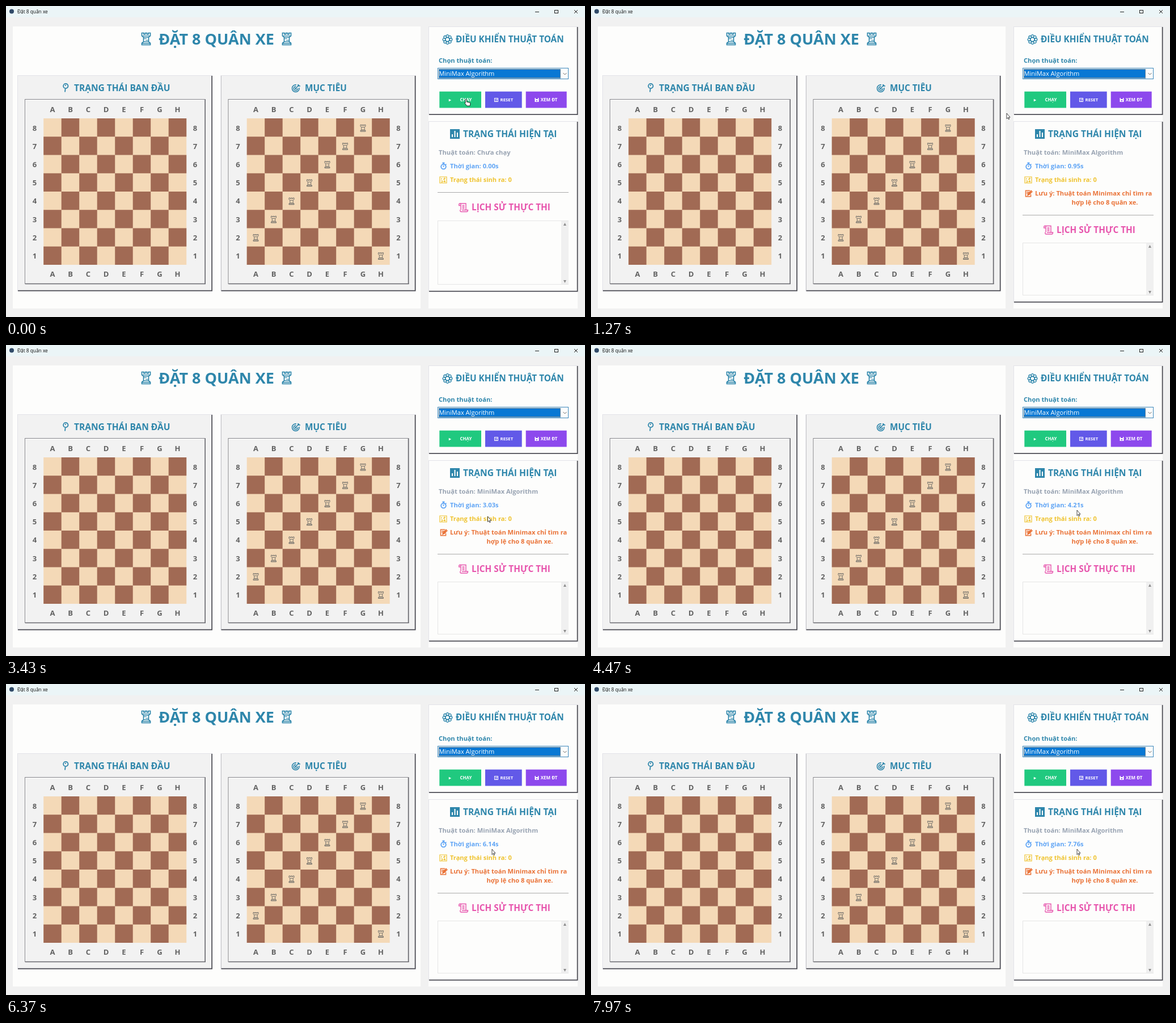
Animation of 1021 by 548 pixels, one loop 8 s. Source, as an HTML page with a canvas:

```html
<!DOCTYPE html>
<html lang="vi">
<head>
<meta charset="utf-8">
<title>Đặt 8 quân xe</title>
<style>
  html, body { margin: 0; width: 100%; height: 100%; overflow: hidden; background: #f0f0f0; }
  canvas { display: block; }
</style>
</head>
<body>
<canvas id="stage" width="1021" height="548"></canvas>
<script>
const ctx = document.getElementById('stage').getContext('2d');
const LOOP = 8000, START = 230;
const FONT = '"Open Sans", "Noto Sans", sans-serif';
const TEAL = '#2e86ab', PINK = '#e755ad', PANEL = '#fdfdfc', CARD = '#f2f2f2';

// [ms, shown seconds]; the clock advances in small ticks between these
const CLOCK = [[START, 0], [1270, .95], [2470, 2.22], [3430, 3.03], [4470, 4.21], [6370, 6.14], [7970, 7.76], [8200, 7.98]];
// [ms, x, y] of the pointer tip
const POINTER = [[0, 809, 164], [420, 809, 164], [950, 733, 189], [1900, 733, 189], [2150, 732.5, 182],
  [2600, 732.5, 182], [3250, 849.5, 302], [3500, 849.5, 302], [3800, 857, 291], [8000, 857, 291]];

const petals = Array.from({ length: 8 }, (_, i) => {
  const a = i * Math.PI / 4;
  return `M${9 + 6 * Math.cos(a) + 2.3} ${9 + 6 * Math.sin(a)}a2.3 2.3 0 1 0-4.6 0a2.3 2.3 0 1 0 4.6 0`;
}).join('');

const ICONS = {
  rook: 'M2.5 1.5h3.5v2.5h2.5v-2.5h3v2.5h2.5v-2.5h3.5v5l-3 2.5v8l3 2.5v3h-15v-3l3-2.5v-8l-3-2.5zM5.5 9h9M5.5 17h9M3 20h14',
  bricks: 'M4 6.5h12M6 11.5h5M9 14.5h5',
  gear: petals + 'M12.5 9a3.5 3.5 0 1 0-7 0a3.5 3.5 0 1 0 7 0',
  pin: 'M10.5 5a4.2 4.2 0 1 0-8.4 0a4.2 4.2 0 1 0 8.4 0M5.7 9.2l-.7 6.3M5 4.5l1.8-1.4',
  target: 'M13 7a6.3 6.3 0 1 1-5-5M10.5 8a3.6 3.6 0 1 1-3-3.2M7 8l6-6M11 4v-3M11 4h4M8 8.4a1 1 0 1 1-1-1',
  watch: 'M10.3 7.6a4.3 4.3 0 1 0-8.6 0a4.3 4.3 0 1 0 8.6 0M6 3v-2M4 1h4M9.7 3.2l1.2 1M6 8v-2.5',
  numbers: 'M1 1h12v11h-12zM4 3v3M8 3h2v1.5h-2v1.5h2M3 8h2.5v2.5h-2.5M10 7.5l-2 2h3M10 8v3',
  memo: 'M9 1.2h-7.5v10.6h9v-4M3.3 4h4M3.3 6.3h2.5M5 9.5l1-3l5-5l1.8 1.8l-5 5zM6.5 8l4.5-4.5',
  scroll: 'M4 12v-9q0-2-1.7-2q-1.5 0-1.5 2v1.5h3.2M2.5 1h10.5v11M6.5 4.5h4M6.5 7h4M6.5 9.5h4M6 12.5h10.5q0 3-2 3h-10q-1.6 0-1.6-2v-1.5'
};
for (const k in ICONS) ICONS[k] = new Path2D(ICONS[k]);

const ARROW = new Path2D('M0 0v11l2.5-2.3l1.8 3.6l1.6-.8l-1.7-3.4h3.4z');
const HAND = new Path2D('M1 1q1.5-1.5 2.4 0v4l5 1q1.5.4 1.5 2l-.8 4h-5.4l-3.5-4.6q-.6-1.5 1-1z');

function rect(x, y, x2, y2, fill) {
  ctx.fillStyle = fill;
  ctx.fillRect(x, y, x2 - x, y2 - y);
}

function frame(x, y, x2, y2, color) {
  ctx.strokeStyle = color;
  ctx.lineWidth = 1;
  ctx.strokeRect(x + .5, y + .5, x2 - x - 1, y2 - y - 1);
}

function text(s, x, mid, size, color, align = 'left', weight = 700) {
  ctx.font = `${weight} ${size}px ${FONT}`;
  ctx.textAlign = align;
  ctx.fillStyle = color;
  ctx.fillText(s, x, mid + size * .357);
}

function icon(name, x, y, color, width = 1.3, sx = 1, sy = sx) {
  ctx.save();
  ctx.translate(x, y);
  ctx.scale(sx, sy);
  ctx.strokeStyle = color;
  ctx.lineWidth = width;
  ctx.stroke(ICONS[name]);
  ctx.restore();
}

function line(x, y, x2, y2, color, width = 1) {
  ctx.strokeStyle = color;
  ctx.lineWidth = width;
  ctx.beginPath();
  ctx.moveTo(x, y);
  ctx.lineTo(x2, y2);
  ctx.stroke();
}

function triangle(x, y, dx, dy, color) {
  ctx.fillStyle = color;
  ctx.beginPath();
  ctx.moveTo(x + dx, y + dy);
  ctx.lineTo(x - dx - dy, y + dx - dy);
  ctx.lineTo(x - dx + dy, y - dx - dy);
  ctx.fill();
}

function raised(x, y, x2, y2, fill) {
  rect(x, y, x2, y2, '#e3e3e8');
  rect(x + 1, y + 1, x2, y2, '#484850');
  rect(x + 1, y + 1, x2 - 1.7, y2 - 1.7, fill);
}

function board(dx) {
  raised(20 + dx, 122, 364 + dx, 502.5, CARD);
  frame(34 + dx, 165, 351 + dx, 490, '#fff');
  frame(33 + dx, 164, 352 + dx, 490, '#85858a');
  line(351 + dx, 165, 351 + dx, 490, '#66666c', 1.4);
  line(34 + dx, 489.5, 352 + dx, 489.5, '#66666c', 1.4);

  const w = 31.5, h = 32.25, x0 = 66.2 + dx, y0 = 198;
  rect(x0, y0, x0 + 8 * w, y0 + 8 * h, '#f4d9b7');
  for (let r = 0; r < 8; r++) {
    const mid = 215 + r * 32.2;
    for (const x of [50.5, 333.5]) text(8 - r, x + dx, mid, 13, '#626262', 'center');
    for (const y of [182.5, 472.5]) text('ABCDEFGH'[r], 82 + r * w + dx, y, 13, '#626262', 'center');
    for (let c = 1 - r % 2; c < 8; c += 2) {
      rect(x0 + c * w, y0 + r * h, x0 + (c + 1) * w, y0 + (r + 1) * h, '#a16a54');
    }
  }
}

function titleBar() {
  rect(0, 0, 1021, 20, '#ebf5f7');
  ctx.fillStyle = '#304a68';
  ctx.beginPath();
  ctx.arc(10, 9.5, 4, 0, 7);
  ctx.fill();
  text('Đặt 8 quân xe', 20, 10, 8.35, '#111', 'left', 400);
  line(933, 10.5, 940, 10.5, '#222');
  frame(967, 7, 974, 13, '#222');
  line(1002, 7, 1008, 13, '#222');
  line(1008, 7, 1002, 13, '#222');
}

function boards() {
  rect(12, 36, 731, 533, PANEL);
  for (const x of [237, 485]) {
    icon('rook', x, 46, TEAL, 1.7);
    icon('bricks', x, 46, TEAL, 1.2);
  }
  text('ĐẶT 8 QUÂN XE', 371, 58, 27, TEAL, 'center');
  board(0);
  board(358.5);
  icon('pin', 99, 136, TEAL, 1.8);
  text('TRẠNG THÁI BAN ĐẦU', 120, 144.5, 15.5, TEAL);
  icon('target', 504, 137, TEAL, 1.6);
  text('MỤC TIÊU', 527, 144.5, 15.3, TEAL);
  for (let r = 0; r < 8; r++) {
    const c = (14 - r) % 8;
    icon('rook', 434.5 + c * 31.5, 208.5 + r * 32.2, '#6c6a66', 1.6, .6, .56);
  }
}

function controls() {
  rect(745, 36, 1008, 533, PANEL);
  raised(745, 36, 1008.5, 192, PANEL);
  icon('gear', 769.5, 50, TEAL, 1.4);
  text('ĐIỀU KHIỂN THUẬT TOÁN', 793, 59, 15.35, TEAL);
  text('Chọn thuật toán:', 763, 96.5, 11.15, TEAL);
  frame(761, 109, 992, 129, '#3b87bb');
  rect(763, 111, 978, 127.5, '#0878d4');
  ctx.setLineDash([1, 1]);
  frame(763, 111, 978, 127, '#b98a5c');
  ctx.setLineDash([]);
  text('MiniMax Algorithm', 763.5, 119.5, 11.05, '#fff', 'left', 400);
  line(982.5, 118, 985.5, 121, '#666');
  line(985.5, 121, 988.5, 118, '#666');

  rect(764.3, 150.7, 838, 179.5, '#20c97f');
  triangle(783, 166, 2.2, 0, '#fff');
  text('CHẠY', 800.5, 165.5, 7.9, '#fff');
  rect(845, 150.7, 909.7, 179.5, '#6259e8');
  frame(861, 162, 868, 169, '#fff');
  line(863, 164.5, 867, 164.5, '#fff');
  line(863, 167, 866, 167, '#fff');
  text('RESET', 871.5, 165.5, 7.8, '#fff');
  rect(916.7, 150.7, 988.7, 179.5, '#8d49ed');
  rect(932.5, 162, 939.5, 169, '#fff');
  rect(934, 162, 938, 164, '#8d49ed');
  rect(935, 166, 937, 168, '#8d49ed');
  text('XEM ĐT', 942.7, 165.5, 8, '#fff');
}

function status(t) {
  const on = t >= START, shift = on ? 39.5 : 0, bottom = on ? 510 : 491;
  raised(745, 203, 1008.5, on ? 522.5 : 503.5, PANEL);
  rect(783, 217, 800, 234, TEAL);
  rect(786, 226, 788, 231, PANEL);
  rect(790.5, 220, 792.5, 231, PANEL);
  rect(795, 223, 797, 231, PANEL);
  text('TRẠNG THÁI HIỆN TẠI', 806, 225.5, 15.6, TEAL);

  text('Thuật toán: ' + (on ? 'MiniMax Algorithm' : 'Chưa chạy'), 763, 258, 11.2, '#98a3b2');
  icon('watch', 765.5, 275.5, '#60a5f5', 1.9);
  text(`Thời gian: ${seconds(t).toFixed(2)}s`, 783, 282, 11.2, '#60a5f5');
  icon('numbers', 764, 300, '#efc32f', 1.2);
  text('Trạng thái sinh ra: 0', 783, 306, 11.05, '#efc32f');
  if (on) {
    ctx.save();
    ctx.beginPath();
    ctx.rect(761, 320, 231, 40);
    ctx.clip();
    icon('memo', 765, 324, '#ea7338', 1.6);
    text('Lưu ý: Thuật toán Minimax chỉ tìm ra trạng', 783, 330.5, 11.15, '#ea7338');
    text('hợp lệ cho 8 quân xe.', 906, 346, 11.15, '#ea7338', 'center');
    ctx.restore();
  }

  const sep = on ? 368.5 : 328.5;
  line(761, sep, 992, sep, '#aaa');
  icon('scroll', 798, 347 + shift, PINK, 1.4);
  text('LỊCH SỬ THỰC THI', 821, 355 + shift, 15.35, PINK);
  const top = Math.floor(378 + shift);
  frame(761, top, 992, bottom, '#e6e6e6');
  rect(979, top + 1, 992, bottom - 1, '#f0f0f0');
  triangle(985.5, top + 6.5, 0, -2.5, '#8c8c8c');
  triangle(985.5, bottom - 5.5, 0, 2.5, '#8c8c8c');
}

function segment(keys, t) {
  const i = Math.max(1, keys.findIndex(k => k[0] > t));
  const a = keys[i - 1], b = keys[i];
  return [a, b, (t - a[0]) / (b[0] - a[0])];
}

function seconds(t) {
  if (t < START) return 0;
  const [a, b, f] = segment(CLOCK, t);
  const ticks = Math.round((b[1] - a[1]) / .16);
  return a[1] + (b[1] - a[1]) * Math.floor(f * ticks) / ticks;
}

function pointer(t) {
  const [a, b, f] = segment(POINTER, t);
  const e = f * f * (3 - 2 * f);
  const x = a[1] + (b[1] - a[1]) * e, y = a[2] + (b[2] - a[2]) * e;
  const shape = x > 764 && x < 838 && y > 151 && y < 180 ? HAND : ARROW;
  ctx.save();
  ctx.translate(x, y);
  if (shape === ARROW) ctx.scale(.8, .88);
  ctx.fillStyle = '#fff';
  ctx.strokeStyle = '#111';
  ctx.lineWidth = .9;
  ctx.fill(shape);
  ctx.stroke(shape);
  ctx.restore();
}

function draw(now) {
  const t = now % LOOP;
  rect(0, 0, 1021, 548, '#f1f1f1');
  titleBar();
  boards();
  controls();
  status(t);
  pointer(t);
  requestAnimationFrame(draw);
}
requestAnimationFrame(draw);
</script>
</body>
</html>
```
